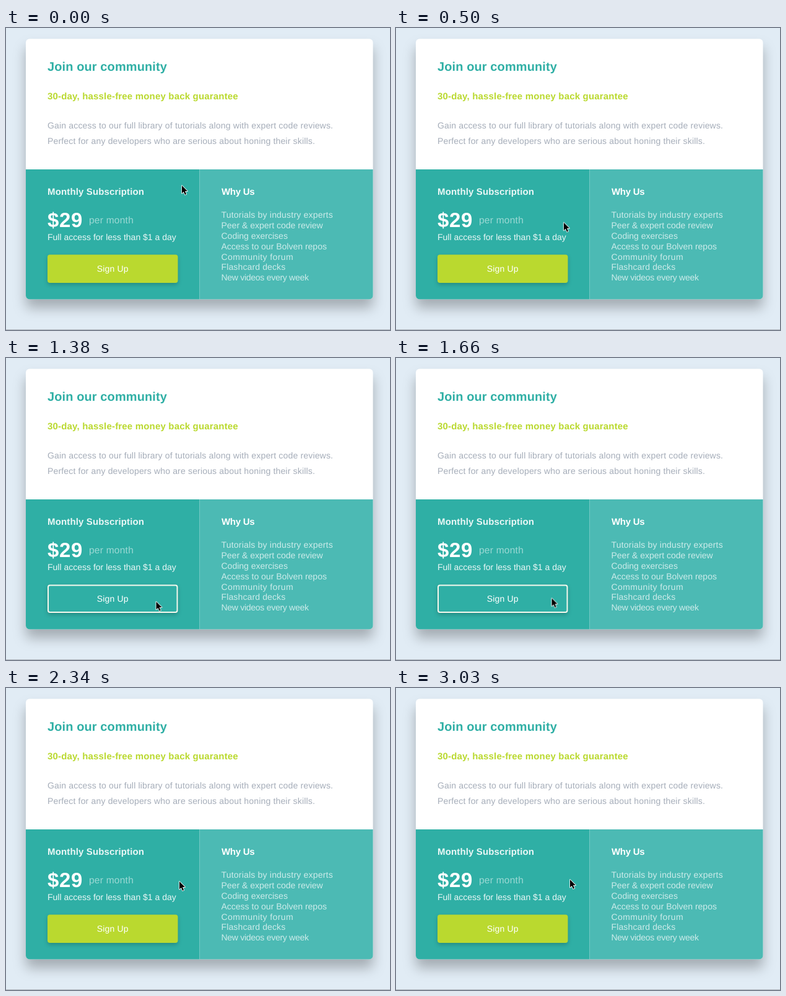
Recreate the animation shown at these times as an HTML page. Size 620 px wide and 487 px high, loop 3.06 s.

```html
<!DOCTYPE html>
<html lang="en">
<head>
<meta charset="utf-8">
<title>Join our community</title>
<style>
  :root { --teal: #2fafa5; --lime: #bad92f; --loop: 3060ms; }
  html, body { margin: 0; width: 100%; height: 100%; overflow: hidden; background: #e1ecf5; }
  svg { display: block; width: 620px; height: 487px; }
  text {
    font: 14px "Liberation Sans", Arial, sans-serif;
    fill: #fff;
    text-rendering: geometricPrecision;
  }
  .bold { font-weight: 700; font-size: 15px; }
  .card { fill: #fff; filter: drop-shadow(0 14px 10px rgba(0, 0, 0, .27)); }
  .title { font-size: 20px; letter-spacing: .1px; fill: var(--teal); }
  .promise { letter-spacing: .18px; fill: var(--lime); }
  .about text { letter-spacing: .17px; fill: #a5adb9; }
  .price { font-size: 33px; letter-spacing: .7px; }
  .period { font-size: 15.5px; letter-spacing: .25px; opacity: .52; }
  .soft { opacity: .9; }
  .perks { opacity: .72; }

  .button {
    fill: var(--lime); stroke: var(--lime); stroke-width: 2;
    filter: drop-shadow(0 3px 3px rgba(0, 0, 0, .2));
    animation: hover var(--loop) ease infinite;
  }
  @keyframes hover {
    0%, 22.876% { fill: var(--lime); stroke: var(--lime); }
    35.948%, 62.745% { fill: var(--teal); stroke: #f6f9ee; }
    75.817%, 100% { fill: var(--lime); stroke: var(--lime); }
  }

  .cursor { animation: point var(--loop) linear infinite; }
  @keyframes point {
    0% { transform: translate(284px, 254px); animation-timing-function: cubic-bezier(.4, .2, .7, .8); }
    16.34% { transform: translate(271px, 313.5px); animation-timing-function: cubic-bezier(.3, .4, .5, 1); }
    29.739% { transform: translate(248px, 391px); animation-timing-function: ease-in-out; }
    45.098% { transform: translate(242.5px, 393px); animation-timing-function: ease-in-out; }
    54.248% { transform: translate(251.5px, 387.5px); animation-timing-function: ease-in-out; }
    76.471% { transform: translate(280px, 312px); animation-timing-function: ease-in-out; }
    99.02%, 100% { transform: translate(281px, 309px); }
  }
</style>
</head>
<body>
<svg viewBox="0 0 620 487">
  <rect y="486" width="620" height="1" fill="#aeb5bb"/>

  <rect class="card" x="32" y="17.5" width="560.5" height="420" rx="6"/>
  <path fill="#2fafa5" d="M32 228H312.5V437.5H38a6 6 0 0 1-6-6Z"/>
  <path fill="#4cbab4" d="M312.5 228H592.5V431.5a6 6 0 0 1-6 6H312.5Z"/>

  <text class="bold title" x="67" y="69">Join our community</text>
  <text class="bold promise" x="67" y="115">30-day, hassle-free money back guarantee</text>
  <g class="about">
    <text x="67" y="162">Gain access to our full library of tutorials along with expert code reviews.</text>
    <text x="67" y="187">Perfect for any developers who are serious about honing their skills.</text>
  </g>

  <text class="bold soft" x="67" y="269" letter-spacing=".14">Monthly Subscription</text>
  <text class="bold price" x="67" y="321">$29</text>
  <text class="period" x="134" y="314.5">per month</text>
  <text class="soft" x="67" y="342">Full access for less than $1 a day</text>

  <rect class="button" x="68" y="366.5" width="208.5" height="43.5" rx="3"/>
  <text x="172.3" y="393" text-anchor="middle" letter-spacing=".15">Sign Up</text>

  <text class="bold" x="348" y="269" letter-spacing="-.3">Why Us</text>
  <g class="perks">
    <text x="347.5" y="306" letter-spacing=".2">Tutorials by industry experts</text>
    <text x="347.5" y="323">Peer &amp; expert code review</text>
    <text x="347.5" y="340">Coding exercises</text>
    <text x="347.5" y="356.7">Access to our Bolven repos</text>
    <text x="347.5" y="373.5" letter-spacing=".4">Community forum</text>
    <text x="347.5" y="390.4" letter-spacing=".13">Flashcard decks</text>
    <text x="347.5" y="407.2" letter-spacing="-.28">New videos every week</text>
  </g>

  <path class="cursor" fill="#000" stroke="#fff" paint-order="stroke" stroke-width="1.6" stroke-linejoin="round"
    d="M0 0V12.6L2.9 9.9 5 14.8 7.1 13.9 5 9.1H9Z"/>
</svg>
</body>
</html>
```
